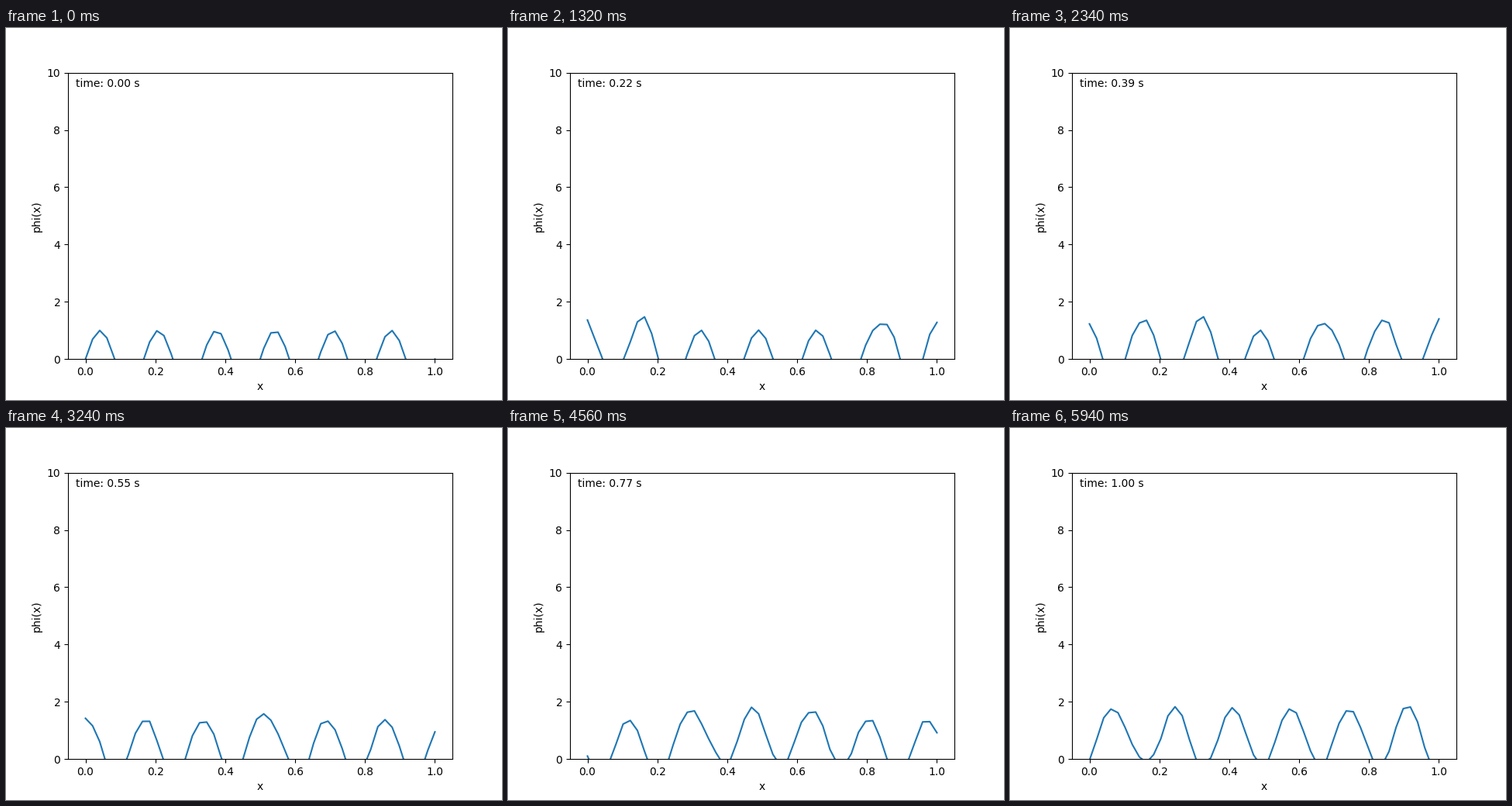
Recreate the animation shown at these times as a matplotlib script. Size 640x480 px, loop 6 s.

```python
import numpy as np
import matplotlib.pyplot as plt
from matplotlib.animation import FuncAnimation

POINTS = 50
FRAMES = 100
INTERVAL = 60  # ms
WAVE_NUMBER = 12 * np.pi

x = np.linspace(0, 1, POINTS)
times = np.linspace(0, 1, FRAMES)

# Closed chain of masses 1/POINTS joined by springs of stiffness POINTS - 1,
# started as a wave running to the left and solved mode by mode.
modes = np.arange(POINTS // 2 + 1)
omega = 2 * np.sqrt(POINTS * (POINTS - 1)) * np.sin(np.pi * modes / POINTS)
start = np.fft.rfft(np.sin(WAVE_NUMBER * x))
speed = np.fft.rfft(WAVE_NUMBER * np.cos(WAVE_NUMBER * x))


def phi(t):
    phase = omega * t
    spectrum = start * np.cos(phase) + speed * t * np.sinc(phase / np.pi)
    return np.fft.irfft(spectrum, POINTS)


plt.rcParams["font.family"] = "DejaVu Sans"
fig, ax = plt.subplots(figsize=(6.4, 4.8), dpi=100)
line, = ax.plot(x, phi(0))
ax.set_xlim(-0.05, 1.05)
ax.set_ylim(0, 10)
ax.set_xlabel("x")
ax.set_ylabel("phi(x)")
label = ax.text(0.02, 0.95, "", transform=ax.transAxes)


def update(frame):
    t = times[frame]
    line.set_ydata(phi(t))
    label.set_text(f"time: {t:.2f} s")
    return line, label


anim = FuncAnimation(fig, update, frames=FRAMES, interval=INTERVAL,
                     repeat=True, repeat_delay=0)
plt.show()
```
